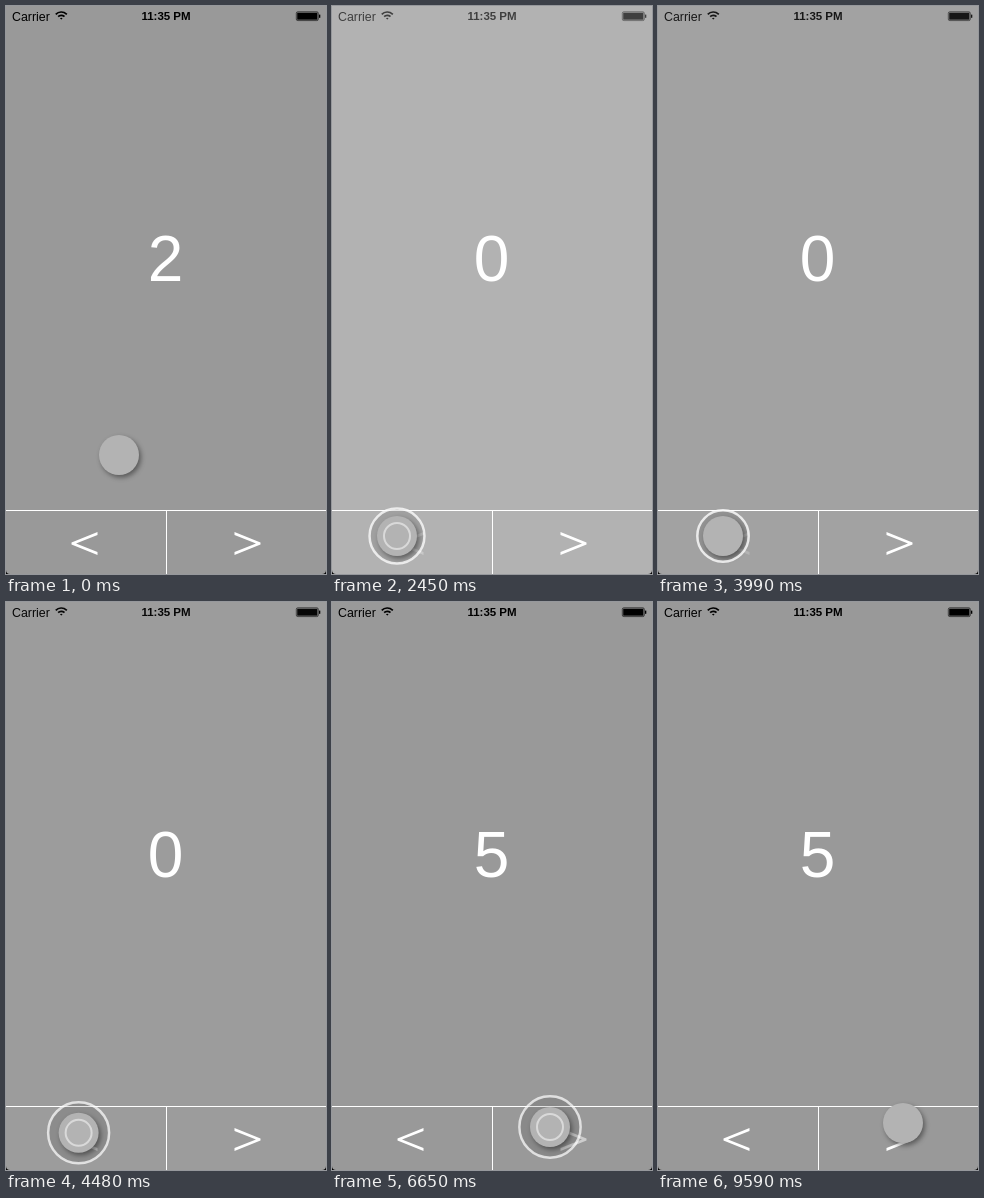
Write an HTML page with a canvas that moves like this. It is 320 by 568 pixels and loops after 9730 ms.

```html
<!DOCTYPE html>
<html lang="en">
<head>
<meta charset="utf-8">
<title>Counter</title>
<style>
  html, body { margin: 0; width: 100%; height: 100%; overflow: hidden; background: #999; }
  canvas { display: block; width: 320px; height: 568px; }
</style>
</head>
<body>
<canvas width="320" height="568"></canvas>
<script>
const LOOP = 9730, STEP = 70, MAX = 5;
const RIPPLE = 350, FLASH = 300;
const FONT = '"Liberation Sans", Arial, sans-serif';
const canvas = document.querySelector('canvas');
const ctx = canvas.getContext('2d');
const scale = window.devicePixelRatio || 1;
canvas.width = 320 * scale;
canvas.height = 568 * scale;

// direction, press, ripple start, release
const clicks = [
  [-1, 1890, 2085, 2095], [-1, 2230, 2254, 2254], [-1, 2590, 2600, 2630],
  [-1, 3780, 3853, 3958], [-1, 4160, 4170, 4190],
  [1, 5110, 5110, 5125], [1, 5410, 5430, 5445], [1, 5710, 5732, 5745],
  [1, 6010, 6033, 6045], [1, 6310, 6335, 6345],
  [1, 7480, 7480, 7485], [1, 7830, 7835, 7840],
  [1, 8300, 8300, 8300], [1, 8660, 8670, 8680]
].map(([dir, press, ripple, release]) => ({ dir, press, ripple, release }));

// time, x, y
const path = [
  [640, 113, 449], [1190, 67, 530], [1330, 67, 530], [1470, 65, 530],
  [4440, 65, 530], [4680, 168, 541], [4970, 218, 525],
  [6780, 218, 525], [7210, 245, 521]
];

const clamp = v => Math.max(0, Math.min(1, v));

function cursorAt(t) {
  const i = path.findIndex(p => p[0] > t);
  if (i === 0) return path[0].slice(1);
  if (i < 0) return path[path.length - 1].slice(1);
  const [t0, x0, y0] = path[i - 1], [t1, x1, y1] = path[i];
  const k = (t - t0) / (t1 - t0), e = k * k * (3 - 2 * k);
  return [x0 + (x1 - x0) * e, y0 + (y1 - y0) * e];
}

function counterAt(t) {
  let value = 2, flash = 0;
  for (const c of clicks) {
    if (t < c.release) break;
    value = Math.max(0, Math.min(MAX, value + c.dir));
    if (value === 0 || value === MAX) {
      flash = 0.28 * Math.sin(Math.PI * clamp((t - c.release) / FLASH));
    }
  }
  return { value, flash };
}

function arrowAlpha(dir, t) {
  const last = clicks.filter(c => c.dir === dir && c.press <= t).pop();
  return last ? 0.2 + 0.8 * clamp((t - last.release - 150) / 400) : 1;
}

function text(str, x, y, font, align, color) {
  ctx.font = font + ' ' + FONT;
  ctx.textAlign = align;
  ctx.fillStyle = color;
  ctx.fillText(str, x, y);
}

function ring(x, y, r, width, color) {
  ctx.beginPath();
  ctx.arc(x, y, r, 0, 7);
  ctx.lineWidth = width;
  ctx.strokeStyle = color;
  ctx.stroke();
}

function disc(x, y, r, color) {
  ctx.beginPath();
  ctx.arc(x, y, r, 0, 7);
  ctx.fillStyle = color;
  ctx.fill();
}

function statusBar() {
  text('Carrier', 6, 14.5, '12.4px', 'left', '#000');
  text('11:35 PM', 160, 14.2, 'bold 11.5px', 'center', '#000');
  ctx.strokeStyle = '#000';
  ctx.lineWidth = 1.7;
  for (const r of [1, 4.3, 7.6]) {
    ctx.beginPath();
    ctx.arc(55.3, 13.6, r, -Math.PI * 0.76, -Math.PI * 0.24);
    ctx.stroke();
  }
  ctx.lineWidth = 0.6;
  ctx.beginPath();
  ctx.roundRect(290.3, 5.8, 22, 8.8, 1.5);
  ctx.stroke();
  ctx.fillStyle = '#000';
  ctx.fillRect(291.2, 6.7, 20.2, 7);
  ctx.fillRect(313, 8.6, 1.3, 3.2);
}

function arrow(dir, t) {
  ctx.save();
  ctx.globalAlpha = arrowAlpha(dir, t);
  ctx.translate(dir < 0 ? 78.5 : 241.5, 537.5);
  ctx.scale(-dir, 1);
  ctx.beginPath();
  for (const [x, y] of [[13, -11.5], [-13, -1], [-13, 1], [13, 11.5], [13, 8.4], [-8.5, 0], [13, -8.4]]) {
    ctx.lineTo(x, y);
  }
  ctx.fillStyle = '#fff';
  ctx.fill();
  ctx.restore();
}

function corners() {
  ctx.fillStyle = '#000';
  for (const [x, side] of [[0, 1], [320, -1]]) {
    ctx.beginPath();
    ctx.moveTo(x, 568);
    ctx.lineTo(x, 564);
    ctx.quadraticCurveTo(x, 568, x + side * 4, 568);
    ctx.fill();
  }
}

function cursor(t) {
  const [x, y] = cursorAt(t);
  const active = clicks.filter(c => t >= c.ripple && t < c.ripple + RIPPLE).pop();
  const u = active ? (t - active.ripple) / RIPPLE : 0;
  const outer = 20 + 11.5 * u ** 0.75;
  if (active) disc(x, y, outer, 'rgba(0,0,0,.1)');

  ctx.save();
  ctx.shadowColor = 'rgba(0,0,0,.42)';
  ctx.shadowBlur = 5 * scale;
  ctx.shadowOffsetX = 2 * scale;
  ctx.shadowOffsetY = 2.5 * scale;
  disc(x, y, 20, '#b3b3b3');
  ctx.restore();

  if (!active) return;
  ring(x, y, outer, 2.5, `rgba(255,255,255,${0.85 - 0.15 * u})`);
  const inner = 13 * clamp((u - 0.4) / 0.14);
  if (inner > 0) ring(x, y, inner, 2, 'rgba(255,255,255,.5)');
}

function draw(t) {
  const { value, flash } = counterAt(t);
  ctx.setTransform(scale, 0, 0, scale, 0, 0);
  ctx.fillStyle = '#999';
  ctx.fillRect(0, 0, 320, 568);
  statusBar();
  ctx.fillStyle = `rgba(255,255,255,${flash})`;
  ctx.fillRect(0, 0, 320, 568);
  text(value, 159.5, 275, '64px', 'center', '#fff');
  ctx.fillRect(0, 504, 320, 1);
  ctx.fillRect(160, 504, 1, 64);
  arrow(-1, t);
  arrow(1, t);
  corners();
  cursor(t);
}

const start = performance.now();
function tick() {
  const t = (performance.now() - start) % LOOP;
  draw(Math.floor(t / STEP) * STEP);
  requestAnimationFrame(tick);
}
tick();
</script>
</body>
</html>
```
